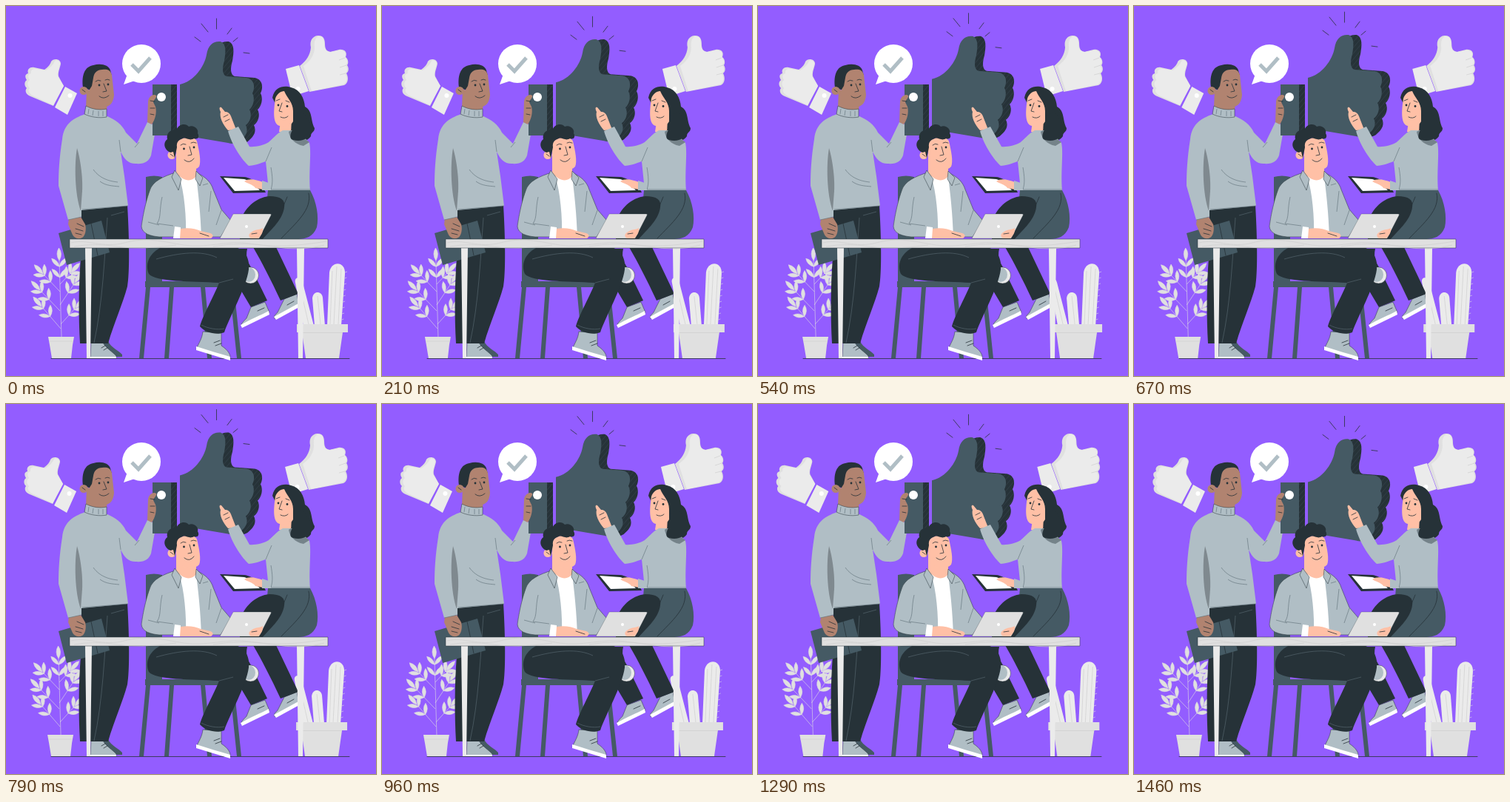
These frames come from a looping animation (500x500 px, 1.5 s). An HTML page:

```html
<!DOCTYPE html>
<html lang="en">
<head>
<meta charset="utf-8">
<title>Team with thumbs up</title>
<style>
html, body { margin: 0; width: 100%; height: 100%; overflow: hidden; background: #935dff; }
svg { display: block; width: 100vw; height: 100vh; }
.ink { fill: #263238; }
.slate { fill: #455a64; }
.wool { fill: #b0bec5; }
.pale { fill: #ebebeb; }
.dim { fill: #e0e0e0; }
.white { fill: #fff; }
.brown { fill: #b18370; }
.peach { fill: #ffc0a6; }
.line { fill: none; stroke: #263238; stroke-width: .8; stroke-linecap: round; }
.thin { stroke: #263238; stroke-width: .5; stroke-linejoin: round; }
.soft { fill: none; stroke: #cfcfcf; stroke-width: .7; }
.fold { fill: none; stroke: #5d6d76; stroke-width: .6; }
</style>
</head>
<body>
<svg viewBox="0 0 500 500">
<defs>
  <pattern id="hatch" width="5" height="5" patternUnits="userSpaceOnUse" patternTransform="rotate(-50)">
    <rect width="5" height="5" fill="#263238"/><path d="M0 0H5" stroke="#3b4b54" stroke-width=".8"/>
  </pattern>
  <path id="palm" d="M235 106C254 102 268 82 271 66C273 52 281 47 290 48C298 51 297 62 295 74C292 84 292 93 298 95L325 97C336 99 337 110 333 118C337 125 334 136 329 140C333 147 330 157 324 161C328 169 324 176 318 181C314 186 306 187 300 185L235 174Z"/>
  <path id="leaf" d="M0 0Q5.500 -9 0 -17Q-5.500 -9 0 0"/>
</defs>

<path class="line" d="M61 476.500H464"/>

<g id="backdrop">
  <path class="dim" d="M64 135L33 122C27 120 25 114 28 111C24 107 25 102 28 100C25 95 26 92 30 91C28 85 33 82 38 83L52 86C58 82 60 78 61 75C64 70 74 71 74 78C73 84 70 89 71 95L78 108Z"/>
  <path class="pale" d="M64 134L38 122C31 119 29 114 32 111C28 107 29 102 32 100C29 95 30 92 34 91C33 86 37 84 42 85L54 87C60 83 64 79 65 76C67 72 73 73 73 78C72 84 69 89 70 95L78 108Z"/>
  <path class="pale" d="M80 109L96 118L83 147L66 137Z"/>
  <circle class="white" cx="86.500" cy="121" r="3"/>
  <path class="dim" d="M397 81C406 74 411 66 412 56C410 47 414 41 421 40C429 39 431 45 431 51C431 58 433 61 438 62L450 59C457 58 462 62 459 69C463 72 463 78 461 80C464 84 463 89 460 91C463 96 463 104 457 107L410 116Z"/>
  <path class="pale" d="M402 81C412 74 417 65 417 56C416 48 418 42 423 41C429 40 430 46 430 51C430 58 433 62 439 62L450 60C456 59 461 63 458 69C462 73 462 77 459 80C462 84 462 89 458 91C462 97 461 103 456 106L413 115Z"/>
  <path class="soft" d="M450 73L458 70M451 83L460 80M451 93L459 91"/>
  <path class="pale" d="M378 85L396 80L409 115L387 122Z"/>
  <circle class="white" cx="394.500" cy="112" r="3"/>
  <g id="plant" class="dim" stroke="#e0e0e0" stroke-width=".6"></g>
  <path class="dim" d="M57 447H92L90 458L88 476H62L59 458Z"/>
  <path class="soft" d="M58 453H91"/>
  <path class="pale" d="M391 374C389 365 399 365 401 374L416 432H402Z"/>
  <path class="pale" d="M414 395C415 384 427 385 428 394L431 432H417Z"/>
  <path class="pale" d="M434 432L437 360C439 344 459 344 458 362L453 432Z"/>
  <path class="soft" d="M396 374L409 430M421 392L425 430M447 352L443 430M453 355L449 430M441 358L438 430"/>
  <path id="spines" stroke="#e0e0e0" stroke-width=".6"/>
  <path class="dim" d="M393 430H462V441H455L450 476H405L400 441H393Z"/>
  <path class="soft" d="M400 441.500H455"/>
</g>

<g id="bubble">
  <path class="white" d="M164 92L159 106L174 101Z"/>
  <circle class="white" cx="183" cy="78" r="26"/>
  <path d="M170 79L179 88L195 70" fill="none" stroke="#b0bec5" stroke-width="5"/>
</g>

<g id="standing">
  <path class="slate" d="M128 453H138C142 462 153 466 157 471V474H148L132 467Z"/>
  <path class="wool thin" d="M115 453L130 453C134 462 145 468 149 473V476H114Z"/>
  <path class="white" d="M114 474H149V476H114Z"/>
  <path class="line" d="M129 462L134 459M132 465L137 462"/>
  <path class="ink" d="M102 274L164 269C167 320 167 362 164 379C158 402 146 428 138 456L100 456C98 420 98 380 101 340Z"/>
  <path class="fold" d="M137 286C133 340 131 400 119 455M142 283L160 278"/>
  <path class="slate" d="M71 307L129 290L140 333L82 350Z"/>
  <path class="line" d="M115 294L124 337"/>
  <path class="brown" d="M85 287L101 285L107 295C109 302 107 311 103 313C97 316 91 313 89 307L84 295Z"/>
  <path class="line" d="M96 294L105 298M94 301L104 304M94 307L102 309"/>
  <path class="wool" d="M107 146C90 152 78 160 76 180C72 205 71 225 71 243L84 289L102 285L102 276L165 270L160 230L155 197C160 207 165 213 175 213C187 214 193 210 196 202L203 162L191 157L177 186L162 171C157 160 148 154 137 149Z"/>
  <path d="M96 192C92 215 93 255 101 277L103 250C104 230 100 205 96 192Z" fill="#7f898f"/>
  <path class="fold" d="M118 221C128 235 143 237 151 238M127 237C135 243 144 243 153 244M155 197L153 181M103 275L165 270M84 289L102 285M180 184L174 191"/>
  <path class="brown" d="M109 112L137 126L136 142C127 145 116 143 108 138Z"/>
  <path class="wool thin" d="M108 135C117 140 128 141 136 139V150C126 152 114 150 106 146Z"/>
  <path class="fold" d="M112 139L111 146M118 141L117 148M125 142L125 149M131 142V149"/>
  <path class="ink" d="M104 110C102 94 106 82 118 80C127 77 139 79 141 87L143 94L115 114Z"/>
  <path class="brown" d="M118 97C119 90 123 86 130 86C136 85 141 86 143 93L146 120C145 134 137 138 128 136C119 136 112 127 111 116L116 108Z"/>
  <circle class="brown" cx="105" cy="114.500" r="5.500"/>
  <path class="line" d="M121 102Q124 99 128 101M134 100Q137 98 140 100M132 105L136 115L131 116M126 122Q132 127 139 121M103 113L107 116" stroke-width="1"/>
  <circle class="ink" cx="126" cy="107" r="1.400"/><circle class="ink" cx="138" cy="106" r="1.400"/>
</g>

<g id="cuff">
  <path d="M222 106H231V175H222Z" fill="url(#hatch)"/>
  <path class="slate" d="M198 106H223V175H198Z"/>
  <circle class="white" cx="210" cy="123" r="6"/>
  <path class="brown" d="M191 157L192 129C193 122 199 118 203 121C204 124 200 126 199 130L202 136C204 143 202 153 197 160Z"/>
  <path class="line" d="M195 128L201 129M195 138L201 138M195 146L200 147"/>
</g>

<g id="thumb">
  <use href="#palm" x="11" fill="url(#hatch)"/>
  <use href="#palm" class="slate"/>
  <path class="line" d="M284.500 17V31M264 24L273 35M305 30L299 38M255 42L263 48M313 43L307 48M321 63L329 64"/>
</g>

<g id="woman">
  <path class="wool thin" d="M376 396L393 389L396 404C390 410 375 416 364 423C361 421 362 419 367 414Z"/>
  <path class="white" d="M362 420L395 402L396 407L365 424Z"/>
  <path class="ink" d="M334 326H365L395 389L371 398C358 370 345 345 334 326Z"/>
  <path class="slate" d="M354 249H411C420 265 423 285 420 299C415 312 405 315 395 315H335L351 280Z"/>
  <path class="ink" d="M316 292C322 274 336 259 356 257C371 257 378 262 376 272C374 290 355 305 346 316H316Z"/>
  <path class="line" d="M409 253C414 275 392 293 372 314M380 258L375 270"/>
  <path class="ink" d="M360 124C363 108 377 107 385 110C398 113 403 125 404 136C415 142 411 154 417 165C417 171 412 170 412 176C406 185 392 184 385 180L378 160Z"/>
  <path class="peach" d="M311 167L304 149C302 144 299 143 296 143L291 137C288 136 288 139 290 143C288 150 293 160 300 168Z"/>
  <path class="line" d="M294 150L300 147M296 156L302 153"/>
  <path class="peach" d="M372 150L386 152L385 172L369 170Z"/>
  <path class="wool" d="M374 168C365 173 360 180 355 184C349 188 336 191 329 190L314 163L300 169C306 190 320 209 328 216C340 215 347 211 351 210L355 249H411C409 222 413 198 410 185C402 176 394 167 385 168Z"/>
  <path d="M385 168C394 176 403 178 410 184L402 189C390 187 383 178 382 170Z" fill="#75838a"/>
  <path class="ink" d="M384 152L400 142L415 164C412 181 398 184 388 181C381 179 386 170 388 164Z"/>
  <path class="fold" d="M351 210L359 191M354 248H411M358 218C360 230 361 239 358 248"/>
  <path class="peach" d="M364 125C366 119 371 115 376 115C380 125 388 130 388 142V156C384 163 378 164 370 162C361 160 361 145 364 125Z"/>
  <path class="line" d="M365 128L370 126M378 128L383 130M373 131L369 142L373 143M371 150Q377 153 381 149" stroke-width="1"/>
  <circle class="ink" cx="368" cy="134" r="1.400"/><circle class="ink" cx="380" cy="135.500" r="1.400"/>
  <path class="ink" d="M289 230L322 231C333 232 349 246 351 252L307 253Z"/>
  <path class="white" d="M294 232L322 234C330 236 338 244 343 249L309 250Z"/>
  <path class="peach" d="M322 237C329 232 338 235 347 238V248L337 246C334 241 326 240 322 237Z"/>
  <path class="wool" d="M346 236L358 240V249H346Z"/>
</g>

<g id="seated">
  <path class="slate" d="M189 231Q200 228 211 231V372H189Z"/>
  <path class="slate" d="M188 372H314V380H188ZM189 380H195L186 476H180ZM221 380H227L220 476H214ZM263 380H269L278 476H272ZM302 380H308L318 476H312Z"/>
  <path class="ink" d="M302 328H326C323 341 328 347 331 353L353 398L331 407L306 365Z"/>
  <circle class="pale thin" cx="330.500" cy="364" r="11"/>
  <ellipse class="wool" cx="328" cy="363" rx="9" ry="10"/>
  <path class="wool thin" d="M331 407L350 400L356 414C352 419 331 427 320 433C316 431 319 428 325 422Z"/>
  <path class="white" d="M317 431C331 423 344 418 355 412L356 417L319 435Z"/>
  <path class="wool thin" d="M266 440L291 442L291 459C300 465 304 471 303 477L257 464C260 456 265 450 266 440Z"/>
  <path class="white" d="M257 460C273 465 289 470 303 474V479L257 465Z"/>
  <path class="ink" d="M208 327C192 336 188 350 193 362C202 373 250 372 288 374C282 390 266 418 262 433C270 442 285 445 295 441C302 420 325 380 328 356C330 338 320 328 310 326Z"/>
  <path class="fold" d="M203 342C235 333 265 330 285 340M288 374L307 369M264 431C273 436 286 438 295 436"/>
  <path class="line" d="M281 455L289 452M283 459L291 456M340 412L349 408M380 404L389 399"/>
  <path class="wool thin" d="M229 225C214 230 198 236 194 250C187 270 184 290 183 298C184 308 196 311 207 312H290L304 290L291 275L280 248C277 238 270 231 257 225Z"/>
  <path class="white" d="M234 230L257 230C260 255 263 280 264 314H243C244 285 241 252 234 230Z"/>
  <path class="peach" d="M230 207L257 217L257 230C251 238 240 238 230 225Z"/>
  <path class="wool thin" d="M228 222L237 234L233 249L224 231ZM257 223L266 232L262 243L256 234Z"/>
  <path class="fold" d="M211 258C207 275 210 286 204 294L226 297M192 292L207 296M277 250L274 278M291 276L284 296M273 240L266 242"/>
  <path class="white" d="M228 298L236 299V314H226Z"/>
  <path class="peach" d="M236 301C247 299 256 301 263 304L276 307C281 309 280 312 277 314H235Z"/>
  <path class="line" d="M262 307L274 311"/>
  <path class="peach" d="M230 184C240 175 256 176 258 183C261 195 264 210 261 217C255 224 240 222 230 214Z"/>
  <circle class="peach" cx="224" cy="201.500" r="5.500"/>
  <path class="ink" d="M222 198C213 194 212 184 218 180C216 172 223 166 230 168C233 159 243 158 247 163C254 160 261 167 259 172C262 177 259 181 254 179C248 183 243 177 239 179C234 181 230 183 231 191L228 206L226 197Z"/>
  <path class="line" d="M236 188Q239 185 243 187M250 185Q253 183 257 185M248 190L251 201L246 202M241 208Q248 214 254 206M222 200L226 203" stroke-width="1"/>
  <circle class="ink" cx="240.500" cy="193" r="1.400"/><circle class="ink" cx="254" cy="191" r="1.400"/>
</g>

<g id="table">
  <path class="pale" d="M107 327H116L114 476H109ZM393 327H403L401 476H395Z"/>
  <path class="dim thin" d="M86 315H435V327H86Z"/>
  <path class="soft" d="M88 320C110 314 130 328 160 320S210 318 240 323S300 316 330 321S390 325 433 318M92 325Q120 320 150 325T230 323M280 325Q320 318 360 325T430 323"/>
  <path class="dim thin" d="M307 281H357Q359 281 358 283L342 314H289Z" stroke-opacity=".5"/>
  <circle class="white" cx="325" cy="298" r="2"/>
  <path class="peach" d="M331 306C337 301 342 303 347 300C348 306 344 311 341 314H331C327 311 328 308 331 306Z"/>
  <path class="line" d="M332 308L339 307"/>
</g>
</svg>
<script>
const LOOP = 1500, STEPS = 36;
const el = id => document.getElementById(id);
const lerp = (a, b, p) => a + (b - a) * p;

// Branches: start x, y and tip x, y; leaves grow in pairs along each.
const branches = [
  [75, 447, 72, 344], [73, 386, 50, 362], [73, 376, 88, 360],
  [73, 412, 46, 384], [73, 404, 93, 374], [74, 436, 48, 406], [74, 430, 94, 408]
];
const leafAt = (x, y, turn, size) =>
  `<use href="#leaf" transform="translate(${x} ${y}) rotate(${turn}) scale(${size})"/>`;
el("plant").innerHTML = branches.map(([x0, y0, x1, y1], i) => {
  const turn = Math.atan2(x1 - x0, y0 - y1) * 180 / Math.PI;
  const pairs = (i ? [.55, .9] : [.78, .92]).map(p =>
    [-42, 42].map(side => leafAt(lerp(x0, x1, p), lerp(y0, y1, p), turn + side, .9)).join(""));
  return `<path d="M${x0} ${y0}L${x1} ${y1}"/>` + pairs.join("") + leafAt(x1, y1, turn, 1);
}).join("");

let ticks = "";
for (let y = 360; y < 428; y += 8) ticks += `M${lerp(458, 453, (y - 360) / 70)} ${y}l3 -1`;
el("spines").setAttribute("d", ticks);

// Timing curve cubic-bezier(.36, .07, .19, .97)
const bezier = (a, b, s) => 3 * s * (1 - s) * ((1 - s) * a + s * b) + s ** 3;
function ease(p) {
  let lo = 0, hi = 1;
  for (let i = 0; i < 20; i++) {
    const mid = (lo + hi) / 2;
    if (bezier(.36, .19, mid) < p) lo = mid; else hi = mid;
  }
  return bezier(.07, .97, lo);
}

const sway = [0, -1, 2, -4, 4, -4, 4, -4, 2, -1, 0];
function draw() {
  const phase = Math.floor((performance.now() + 5) % LOOP / LOOP * STEPS) / STEPS;
  const leg = Math.floor(phase * 10);
  const shift = lerp(sway[leg], sway[leg + 1], ease(phase * 10 - leg));
  const lift = 10 * (1 - Math.abs(1 - 2 * phase));
  el("backdrop").setAttribute("transform", `translate(${shift} 0)`);
  el("thumb").setAttribute("transform", `translate(0 ${-lift})`);
  requestAnimationFrame(draw);
}
draw();
</script>
</body>
</html>
```
